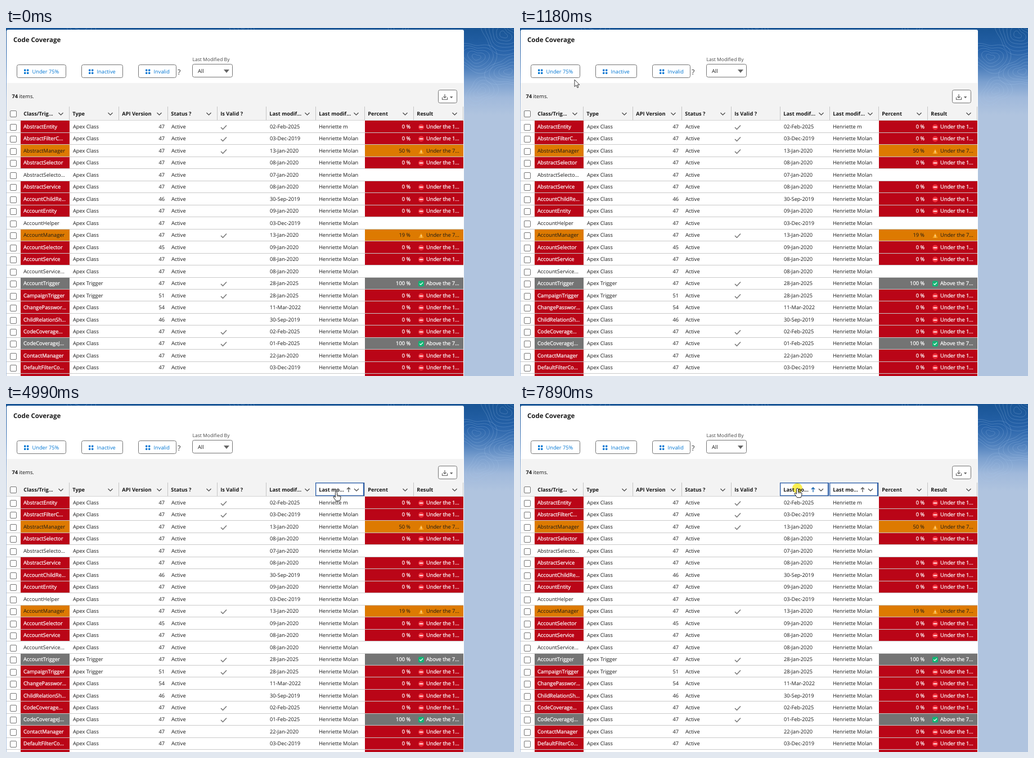
An HTML page for the animation above (8000 ms loop, 903 px wide and 620 px high).

```html
<!DOCTYPE html>
<html lang="en">
<head>
<meta charset="utf-8">
<title>Code Coverage</title>
<style>
html, body { margin: 0; width: 100%; height: 100%; overflow: hidden; background: #b0c4df; }
svg { display: block; }
text {
  font: 9.25px "Open Sans", "Noto Sans", sans-serif;
  fill: #181818;
  text-rendering: geometricPrecision;
  white-space: pre;
}
.b { font-weight: 700; }
.w { fill: #fff; stroke: #fff; stroke-width: .25px; }
.blue { fill: #0176d3; }
</style>
</head>
<body>
<script>
const LOOP = 8000, TOP = 165.4, PITCH = 21.47;
const COLS = [25, 112, 200, 287, 375, 462, 550, 637, 724, 812];
const RED = '#ba0517', ORANGE = '#dd7a01', GREY = '#747474', RING = '#2458a5';
const OWNER = 'Henriette Molan';

// name | C = class, T = trigger | API | valid | modified | percent
const DATA = `AbstractEntity|C|47|1|02-Feb-2025|0
AbstractFilterC...|C|47|1|03-Dec-2019|0
AbstractManager|C|47|1|13-Jan-2020|50
AbstractSelector|C|47||08-Jan-2020|0
AbstractSelecto...|C|47||07-Jan-2020|
AbstractService|C|47||08-Jan-2020|0
AccountChildRe...|C|46||30-Sep-2019|0
AccountEntity|C|47||09-Jan-2020|0
AccountHelper|C|47||03-Dec-2019|
AccountManager|C|47|1|13-Jan-2020|19
AccountSelector|C|45||09-Jan-2020|0
AccountService|C|47||08-Jan-2020|0
AccountService...|C|47||08-Jan-2020|
AccountTrigger|T|47|1|28-Jan-2025|100
CampaignTrigger|T|51|1|28-Jan-2025|0
ChangePasswor...|C|54||11-Mar-2022|0
ChildRelationSh...|C|46||30-Sep-2019|0
CodeCoverage...|C|47|1|02-Feb-2025|0
CodeCoverageJ...|C|47|1|01-Feb-2025|100
ContactManager|C|47||22-Jan-2020|0
DefaultFilterCo...|C|47||03-Dec-2019|0
ExpressionInter...|C|49||08-Sep-2020|0`.split('\n').map(r => r.split('|'));

function el(tag, attrs, parent) {
  const node = document.createElementNS('http://www.w3.org/2000/svg', tag);
  for (const k in attrs) node.setAttribute(k, attrs[k]);
  if (parent) parent.append(node);
  return node;
}
const rect = (p, x, y, width, height, fill, more) => el('rect', { x, y, width, height, fill, ...more }, p);
const line = (p, d, stroke, width = 1, more) =>
  el('path', { d, stroke, 'stroke-width': width, fill: 'none', ...more }, p);
function text(p, x, y, str, cls = '', more) {
  const node = el('text', { x, y, class: cls, ...more }, p);
  node.textContent = str;
  return node;
}
const group = p => el('g', {}, p);
const show = (node, on) => { node.style.display = on ? '' : 'none'; };
const rowTop = i => Math.round(TOP + PITCH * i);

const svg = el('svg', { width: 903, height: 620, viewBox: '0 0 903 620' }, document.body);

function backdrop() {
  const defs = el('defs', {}, svg);
  const grad = el('linearGradient', { id: 'sky', x1: 0, y1: 0, x2: 0, y2: 1 }, defs);
  [[0, '#195595'], [.25, '#2561a8'], [.45, '#4a7dbb'], [.62, '#7ba0cf'], [.8, '#a0b9db'], [1, '#b0c4df']]
    .forEach(([offset, c]) => el('stop', { offset, 'stop-color': c }, grad));
  rect(svg, 0, 0, 903, 620, '#b0c4df');
  rect(svg, 0, 0, 903, 155, 'url(#sky)');
  // nested wobbly contours
  [[884, 12, 6], [836, 52, 5], [893, 78, 5], [846, 112, 4], [700, -8, 4], [420, -6, 4], [130, -8, 4]]
    .forEach(([cx, cy, n], s) => {
      for (let k = 1; k <= n; k++) {
        let d = '';
        for (let a = 0; a < 48; a++) {
          const q = a * Math.PI / 24;
          const r = k * 6.5 * (1 + .2 * Math.sin(2 * q + s) + .13 * Math.sin(3 * q + s * 2 + k * .3));
          d += (a ? 'L' : 'M') + (cx + r * Math.cos(q)).toFixed(1) + ' ' + (cy + r * .9 * Math.sin(q)).toFixed(1);
        }
        line(svg, d + 'Z', '#a9c8ea', .8, { opacity: .32 });
      }
    });
}

const buttons = [];
function button(x, w, label) {
  buttons.push({ x, w, node: rect(svg, x + .5, 65.5, w - 1, 23, '#fff', { rx: 3, stroke: '#747474' }) });
  for (const dx of [13, 18])
    for (const dy of [73.5, 78.5]) rect(svg, x + dx, dy, 3.4, 3.4, '#0176d3', { rx: 1.2 });
  text(svg, x + 27.5, 81, label, 'blue');
}

const chevron = (p, x) => line(p, `M${x - 4} 151l4 4 4-4`, '#444', 1.2);

function chrome() {
  rect(svg, 1, 3, 813, 630, '#fff', { rx: 3 });
  text(svg, 13, 24.5, 'Code Coverage', 'b', { style: 'font-size:11.5px' });
  button(19, 88, 'Under 75%');
  button(134, 74, 'Inactive');
  button(235, 68, 'Invalid');
  text(svg, 305, 82.5, '?', '', { style: 'font-size:12.5px;fill:#333' });
  text(svg, 331.5, 59, 'Last Modified By', '', { style: 'font-size:8.55px;fill:#444' });
  rect(svg, 331.5, 64.5, 71, 23, '#fff', { rx: 3, stroke: '#747474' });
  text(svg, 341, 79.5, 'All');
  el('path', { d: 'M387 74h10l-5 6z', fill: '#666' }, svg);

  rect(svg, 1, 98, 812, 67, '#f3f3f3');
  text(svg, 10.5, 125, '74', 'b');
  text(svg, 23.5, 125, 'items.');
  rect(svg, 768.5, 110.5, 33, 23, '#fff', { rx: 3, stroke: '#747474' });
  line(svg, 'M780 118v6M777.3 121.8l2.7 2.7 2.7-2.7M775.5 123.5v4h9v-4', '#666', 1.2);
  el('path', { d: 'M789 122h5.4l-2.7 3.2z', fill: '#666' }, svg);
}

function checkbox(p, y) {
  rect(p, 7.5, y, 11, 11, '#fff', { rx: 1.5, stroke: '#747474' });
}

function header() {
  checkbox(svg, 147.5);
  ['Class/Trig...', 'Type', 'API Version', 'Status ?', 'Is Valid ?', 'Last modif...', 'Last modif...', 'Percent', 'Result']
    .forEach((label, i) => {
      text(svg, COLS[i] + 6.3, 156, label, 'b');
      if (i !== 4) chevron(svg, COLS[i + 1] - 14.5);
      line(svg, `M${COLS[i + 1] + .5} 140v24`, '#c4c4c4');
    });
  line(svg, 'M1 164.5H813', '#d4d4d4');
}

function resultIcon(p, pct, y) {
  if (pct === 0) {
    el('circle', { cx: 738, cy: y, r: 5, fill: '#ee2f3a' }, p);
    rect(p, 734.7, y - .9, 6.6, 1.8, '#fff');
  } else if (pct < 75) {
    el('path', { d: `M738 ${y - 4}l4.6 8.5h-9.2z`, fill: '#f7a11c' }, p);
    line(p, `M738 ${y - 1}v2.8m0 .8v1`, '#fff', 1.1);
  } else {
    rect(p, 733, y - 5, 10, 10, '#13b575', { rx: 2 });
    line(p, `M735.3 ${y}l2 2 3.6-4`, '#fff', 1.2);
  }
}

function row(p, rec, i) {
  const [name, kind, api, valid, date, pctText] = rec;
  const y = rowTop(i), h = rowTop(i + 1) - y;
  const base = Math.round(179 + PITCH * i);
  const pct = pctText === '' ? null : +pctText;
  const fill = pct === null ? null : pct === 0 ? RED : pct < 75 ? ORANGE : GREY;
  const cls = fill && fill !== ORANGE ? 'w' : '';
  checkbox(p, base - 7.5);
  if (fill) {
    rect(p, 26, y, 87, h, fill);
    rect(p, 638, y, 175, h, fill);
    text(p, 719, base, pct + ' %', cls, { 'text-anchor': 'end' });
    resultIcon(p, pct, base - 2.5);
    text(p, 747, base, pct === 0 ? 'Under the 1...' : pct < 75 ? 'Under the 7...' : 'Above the 7...', cls);
  }
  text(p, 31, base, name, cls);
  text(p, 119, base, kind === 'C' ? 'Apex Class' : 'Apex Trigger');
  text(p, 282, base, api, '', { 'text-anchor': 'end' });
  text(p, 294, base, 'Active');
  if (valid) line(p, `M382 ${base - 2}l3.5 3.5 6.5-7`, '#747474', 1.5);
  text(p, 469, base, date);
  text(p, 556, base, rec === DATA[0] ? 'Henriette m' : OWNER);
  line(p, `M1 ${y + h - .5}H813`, '#c9c9c9');
}

function table(rows) {
  const g = group(svg);
  rows.forEach((r, i) => row(g, r, i));
  return g;
}

// header cell with its sort arrow
function sortCell(x, color) {
  const g = group(svg);
  const bg = rect(g, x + 1, 140, 86, 24, '#f3f3f3');
  text(g, x + 6.3, 156, 'Last mo...', 'b');
  chevron(g, x + 73);
  const up = line(g, `M${x + 59} 157v-8m-3 3l3-3 3 3`, color, 1.3);
  const down = line(g, `M${x + 59} 149v8m-3-3l3 3 3-3`, '#2a7f6c', 1.4);
  const ring = group(g);
  rect(ring, x + 1.5, 141.5, 84, 21, 'none', { stroke: RING, opacity: .3 });
  rect(ring, x + .5, 140.5, 86, 23, 'none', { stroke: RING });
  rect(ring, x + 85, 140, 2, 24, RING);
  return (on, focus, desc) => {
    show(g, on || focus);
    show(ring, focus);
    show(up, !desc);
    show(down, desc);
    bg.setAttribute('fill', focus ? '#fff' : '#f3f3f3');
  };
}

backdrop();
chrome();
header();
const hover = rect(svg, 1, 0, 812, 21, '#f3f3f3');
const ascending = table(DATA);
const descending = table(DATA.slice(1));
const dateCell = sortCell(462, '#0b5cab');
const ownerCell = sortCell(550, '#555');
const guide = rect(svg, 549.5, 140, 1, 480, '#0176d3');
const glow = el('circle', { r: 9, fill: '#fbee52', style: 'mix-blend-mode:multiply' }, svg);
const pointer = el('path', { d: 'M0 0V12.5L3 9.8 5 14.4 6.9 13.6 5 9.2H8.8Z', fill: '#fff', stroke: '#222', 'stroke-width': .9 }, svg);
const hand = group(svg);
el('path', {
  d: 'M-1.6 .8a1.6 1.6 0 0 1 3.2 0V5.6l4.6.9q2 .5 1.9 2.6l-.6 3.4-1.3 3.2H-.4l-1.6-2.4-3-4.1q-.4-1.5 1-1.6.9 0 2.4 1.6z',
  fill: '#fff', stroke: '#222', 'stroke-width': 1
}, hand);
line(hand, 'M1.6 5.5v3M3.9 6.2v2.5M6 6.7v2', '#222', .7);

// time, x, y
const PATH = [
  [200, 428, 602], [320, 394, 400], [446, 368, 254], [700, 225, 165], [980, 93, 94],
  [1110, 97, 92], [1190, 97, 92], [1300, 95, 82], [1400, 110, 82], [1620, 172, 82],
  [2030, 172, 82], [2200, 300, 130], [2350, 430, 166], [2480, 545, 169], [2590, 590, 161],
  [2760, 590, 161], [2840, 587, 156], [4990, 587, 156], [5160, 583, 153],
  [7270, 583, 153], [7510, 493, 150], [8000, 493, 150]
];
// start, end, number of steps
const MOVES = [[200, 980, 20], [1020, 1620, 15], [2030, 2590, 14], [2760, 2840, 3], [4990, 5160, 4], [7270, 7510, 7]];
const CLICKS = [[3050, 3170], [5780, 5900], [6860, 6980], [7850, 8000]];

function cursorAt(t) {
  const m = MOVES.find(([a, b]) => t >= a && t < b);
  if (m) {
    const step = (m[1] - m[0]) / (m[2] - 1);
    t = m[0] + Math.floor((t - m[0]) / step) * step;
  }
  const i = Math.max(1, PATH.findIndex(p => p[0] >= t));
  const [a, b] = [PATH[i - 1], PATH[i]];
  const k = (t - a[0]) / (b[0] - a[0]);
  return [1, 2].map(j => Math.round(a[j] + (b[j] - a[j]) * k));
}

function render(t) {
  const [x, y] = cursorAt(Math.max(t, 200));
  const visible = t >= 200;
  const desc = t >= 5990 && t < 7020;
  const inHead = visible && y >= 140 && y < TOP;
  const overHead = (a, b) => inHead && x >= a && x < b;
  show(ascending, !desc);
  show(descending, desc);

  const i = Math.floor((y - TOP) / PITCH);
  show(hover, visible && i >= 0);
  if (i >= 0) {
    hover.setAttribute('y', rowTop(i));
    hover.setAttribute('height', rowTop(i + 1) - rowTop(i));
  }

  let overButton = false;
  for (const b of buttons) {
    const on = visible && y >= 65 && y < 89 && x >= b.x && x < b.x + b.w;
    b.node.setAttribute('fill', on ? '#f3f3f3' : '#fff');
    overButton = overButton || on;
  }

  ownerCell(overHead(550, 637), t >= 3110, desc);
  dateCell(overHead(462, 550), t >= 7890, false);
  show(guide, t > 7270 && t < 7510 && Math.abs(x - 550) < 8);

  const useHand = overButton || inHead;
  show(hand, visible && useHand);
  show(pointer, visible && !useHand);
  hand.setAttribute('transform', `translate(${x} ${y + 1})`);
  pointer.setAttribute('transform', `translate(${x} ${y})`);
  glow.setAttribute('transform', `translate(${x} ${y})`);
  show(glow, CLICKS.some(([a, b]) => t >= a && t < b));
}

const start = performance.now();
function tick() {
  render((performance.now() - start) % LOOP);
  requestAnimationFrame(tick);
}
tick();
</script>
</body>
</html>
```
